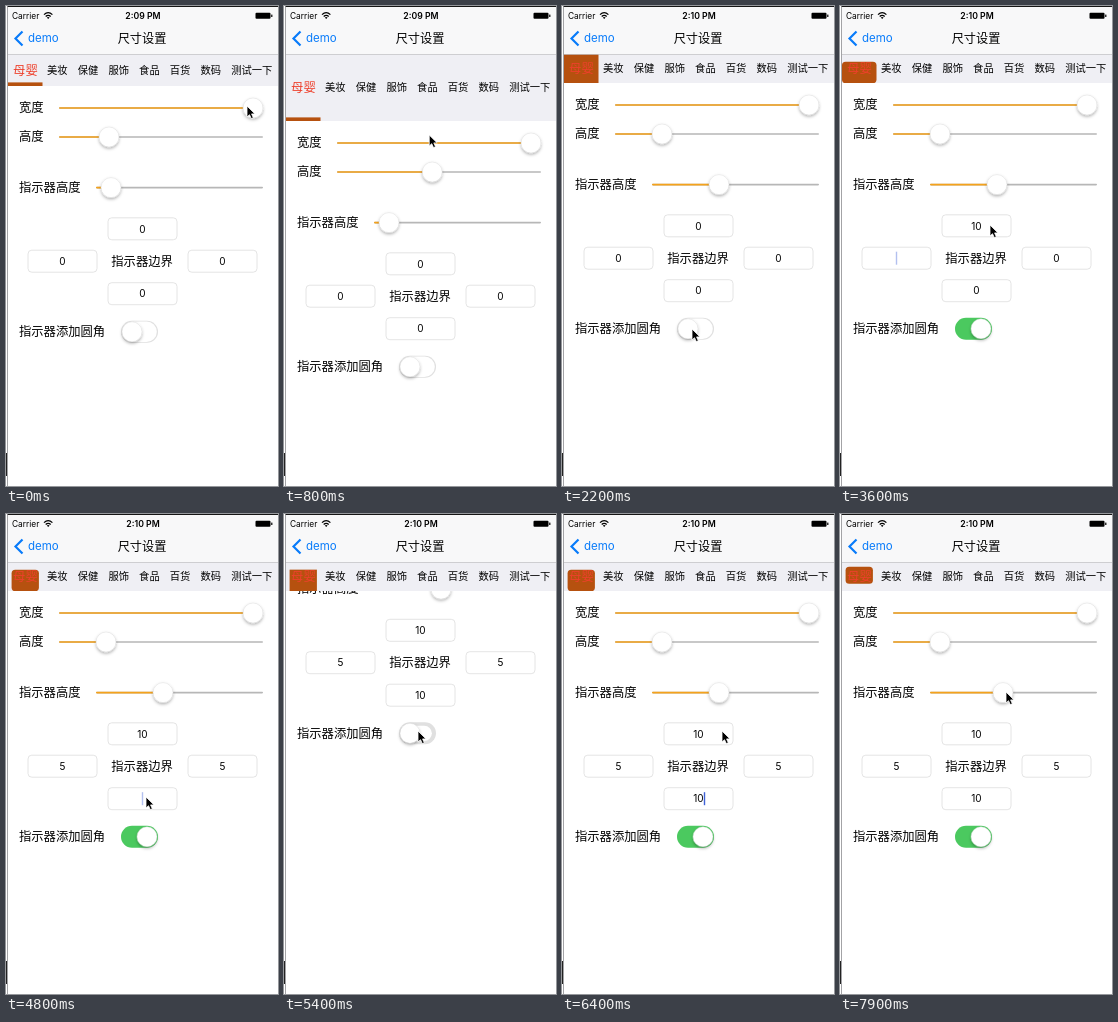
An HTML page for the animation above (8000 ms loop, 272x480 px).

```html
<!DOCTYPE html>
<html lang="zh">
<head>
<meta charset="utf-8">
<style>
html, body { margin: 0; width: 100%; height: 100%; overflow: hidden; background: #fff; }
svg { display: block; width: 100vw; height: 100vh; }
text { font-family: Inter, "Noto Sans CJK SC", "Noto Sans CJK", sans-serif; }
</style>
</head>
<body>
<svg viewBox="0 0 272 480">
  <defs>
    <filter id="shadow" x="-40%" y="-40%" width="180%" height="190%">
      <feDropShadow dx="0" dy="1.6" stdDeviation="1.4" flood-color="#000" flood-opacity=".3"/>
    </filter>
  </defs>
  <g id="scene"></g>
</svg>
<script>
const LOOP = 8000, STEP = 100, BAR_TOP = 48.5, PT = .72;
const TABS = ['美妆', '保健', '服饰', '食品', '百货', '数码', '测试一下'];

const clamp = p => Math.min(1, Math.max(0, p));
const linear = (t, from, to) => clamp((t - from) / (to - from));
function ease(t, from, to) {
  const p = linear(t, from, to);
  return p * p * (3 - 2 * p);
}

// Control values over time
const barThumb = t => 103 - 3 * ease(t, 300, 900) + 96 * Math.sin(Math.PI * linear(t, 300, 900));
const lineThumb = t => 105 + 52 * ease(t, 1200, 1700) + 6 * ease(t, 7100, 7900);
const scrolled = t => 103.5 * (ease(t, 5050, 5200) - ease(t, 5800, 6100));
const switched = (t, offTime) => ease(t, 2200, 2400) - ease(t, 5200, 5200 + offTime) + ease(t, 5600, 5800);
const barBottom = t => Math.floor(80 + .778 * (barThumb(t) - 103));

// Edge insets are filled in one after another, each typed key by key.
const FIELDS = [
  { side: 'top', text: '10', x: 136.5, y: 142.8 },
  { side: 'left', text: '5', x: 56.5, y: 175.2 },
  { side: 'right', text: '5', x: 216.5, y: 175.2 },
  { side: 'bottom', text: '10', x: 136.5, y: 207.7 }
];
FIELDS.forEach((f, i) => f.start = 2800 + 650 * i);
const typed = (f, t) => t < f.start ? '0' : f.text.slice(0, Math.floor((t - f.start) / 160));
const focused = t => FIELDS.filter(f => f.start <= t).pop();
function inset(side, t) {
  const f = FIELDS.find(f => f.side === side);
  const waiting = side === 'bottom' && t < 7150; // takes effect with the next slider move
  return !waiting && typed(f, t) === f.text ? PT * f.text : 0;
}

// Where the pointer is from each moment on; it glides over shortly before.
const VISITS = [
  [0, () => [241, 100]],
  [300, t => [barThumb(t) - 3, 129]],
  [1200, t => [lineThumb(t), 177]],
  [2100, () => [130, 323]],
  [2750, () => [150, 219]],
  [4100, () => [215, 250]],
  [4750, () => [140, 283]],
  [5050, t => [190, 440 - scrolled(t)]],
  [5300, () => [134, 217]],
  [5800, t => [190, 374 - scrolled(t)]],
  [6400, () => [160, 217]],
  [7100, t => [lineThumb(t) + 3, 178]]
];
function pointer(t) {
  const i = VISITS.filter(v => v[0] <= t).length - 1;
  const here = VISITS[i][1](t), next = VISITS[i + 1];
  if (!next) return here;
  const p = ease(t, next[0] - 150, next[0]), there = next[1](t);
  return here.map((v, n) => v + (there[n] - v) * p);
}

// Drawing helpers
function label(s, x, y, size, extra = '') {
  return `<text x="${x}" y="${y + size * .37}" font-size="${size}" ${extra}>${s}</text>`;
}
function rect(x, y, w, h, fill, extra = '') {
  return `<rect x="${x}" y="${y}" width="${w}" height="${h}" fill="${fill}" ${extra}/>`;
}
function thumb(x, y) {
  return `<circle cx="${x}" cy="${y}" r="10" fill="#fff" stroke="#d4d4d4" stroke-width=".4" filter="url(#shadow)"/>`;
}
function slider(left, x, y) {
  return rect(left, y - .8, 257 - left, 1.6, '#b7b7b7', 'rx=".8"') +
    rect(left, y - .8, x - left, 1.6, '#f5a31c', 'rx=".8"') + thumb(x, y);
}
function field(f, t, y) {
  const s = typed(f, t), lit = focused(t) === f && (t + 150) % 700 < 330;
  return rect(f.x - 34.5, y - 11, 69, 22, '#fff', 'rx="3.8" stroke="#dedede" stroke-width=".8"') +
    label(s, f.x, y, 10, 'text-anchor="middle"') +
    (lit ? rect(f.x + s.length * 3 - .7, y - 6.5, 1.4, 13, '#3f62d6', s ? '' : 'opacity=".4"') : '');
}
function toggle(t, y) {
  const on = switched(t, 200), hollow = 1 - switched(t, 300);
  const w = 34.6 * hollow, h = 20.6 * hollow;
  return rect(115, y - 11, 37, 22, on > .3 ? '#4bc95f' : '#e0e0e0', 'rx="11"') +
    rect(139.5 - 6 * hollow - w / 2, y - h / 2, w, h, '#fff', `rx="${h / 2}"`) +
    thumb(126 + 15 * on, y);
}

function statusBar(t) {
  const minute = t < 1000 ? '2:09 PM' : '2:10 PM';
  return rect(2, 1, 270, 47, '#f8f8f9') + rect(2, 48, 270, .6, '#b4b4b8') +
    label('Carrier', 6, 9.7, 8.4) +
    label(minute, 137, 9.7, 8.7, 'text-anchor="middle" font-weight="600"') +
    `<path d="M38 8.6Q42.2 4.6 46.4 8.6M39.7 10.5Q42.2 8.2 44.7 10.5" fill="none" stroke="#000" stroke-width="1.3"/>
    <path d="M40.8 11.6Q42.2 10.4 43.6 11.6L42.2 13Z"/>` +
    rect(249.5, 6.8, 15, 6, '#000', 'rx="1"') + rect(265.2, 8.6, 1.2, 2.4, '#000') +
    `<path d="M16.5 25.5L9.5 32.5L16.5 39.5" fill="none" stroke="#087bfa" stroke-width="2.2"/>` +
    label('demo', 22, 32.2, 11.5, 'fill="#087bfa"') +
    label('尺寸设置', 136, 32.5, 12.2, 'text-anchor="middle" font-weight="500"');
}

function tabBar(t, bottom) {
  const mid = (48 + bottom) / 2;
  const [top, left, right, low] = ['top', 'left', 'right', 'bottom'].map(side => inset(side, t));
  const size = 3.6 + .48 * (lineThumb(t) - 105);
  const corner = switched(t, 200) > .3 ? 'rx="3.6"' : '';
  return rect(2, BAR_TOP, 270, bottom - BAR_TOP, '#efeff4') +
    rect(2 + left, bottom - size + top, 34.5 - left - right, size - top - low, '#b6510f', corner) +
    label('母婴', 7, mid, 12.4, 'fill="#ee402c"') +
    TABS.map((s, i) => label(s, 41 + 30.7 * i, mid - .2, 10.3)).join('');
}

function content(t, y) {
  const caption = (s, x, dy) => label(s, x, y + dy, 12.3);
  return caption('宽度', 13, 21.5) + slider(53, 247, y + 22) +
    caption('高度', 13, 50.7) + slider(53, barThumb(t), y + 51) +
    caption('指示器高度', 13, 101.3) + slider(90, lineThumb(t), y + 101.6) +
    caption('指示器边界', 105.3, 175.2) + FIELDS.map(f => field(f, t, y + f.y)).join('') +
    caption('指示器添加圆角', 13, 245.7) + toggle(t, y + 245.8);
}

function windowEdge() {
  return rect(1, 0, 271, 1, '#151515') + rect(1, 0, .8, 480, '#8c8c90') + rect(0, 447, 1, 23, '#222');
}

function cursor(t) {
  return `<path transform="translate(${pointer(t)})" d="M0 0V11L2.5 8.7L4.3 12.6L6.3 11.7L4.6 7.9H8Z" fill="#000" stroke="#fff" stroke-width=".8"/>`;
}

const scene = document.getElementById('scene');
const start = performance.now();
let shown = -1;
function tick() {
  const t = Math.floor((performance.now() - start) % LOOP / STEP) * STEP;
  if (t !== shown) {
    shown = t;
    const bottom = barBottom(t);
    scene.innerHTML = rect(0, 0, 272, 480, '#fff') + content(t, bottom - scrolled(t)) +
      tabBar(t, bottom) + statusBar(t) + windowEdge() + cursor(t);
  }
  requestAnimationFrame(tick);
}
tick();
</script>
</body>
</html>
```
